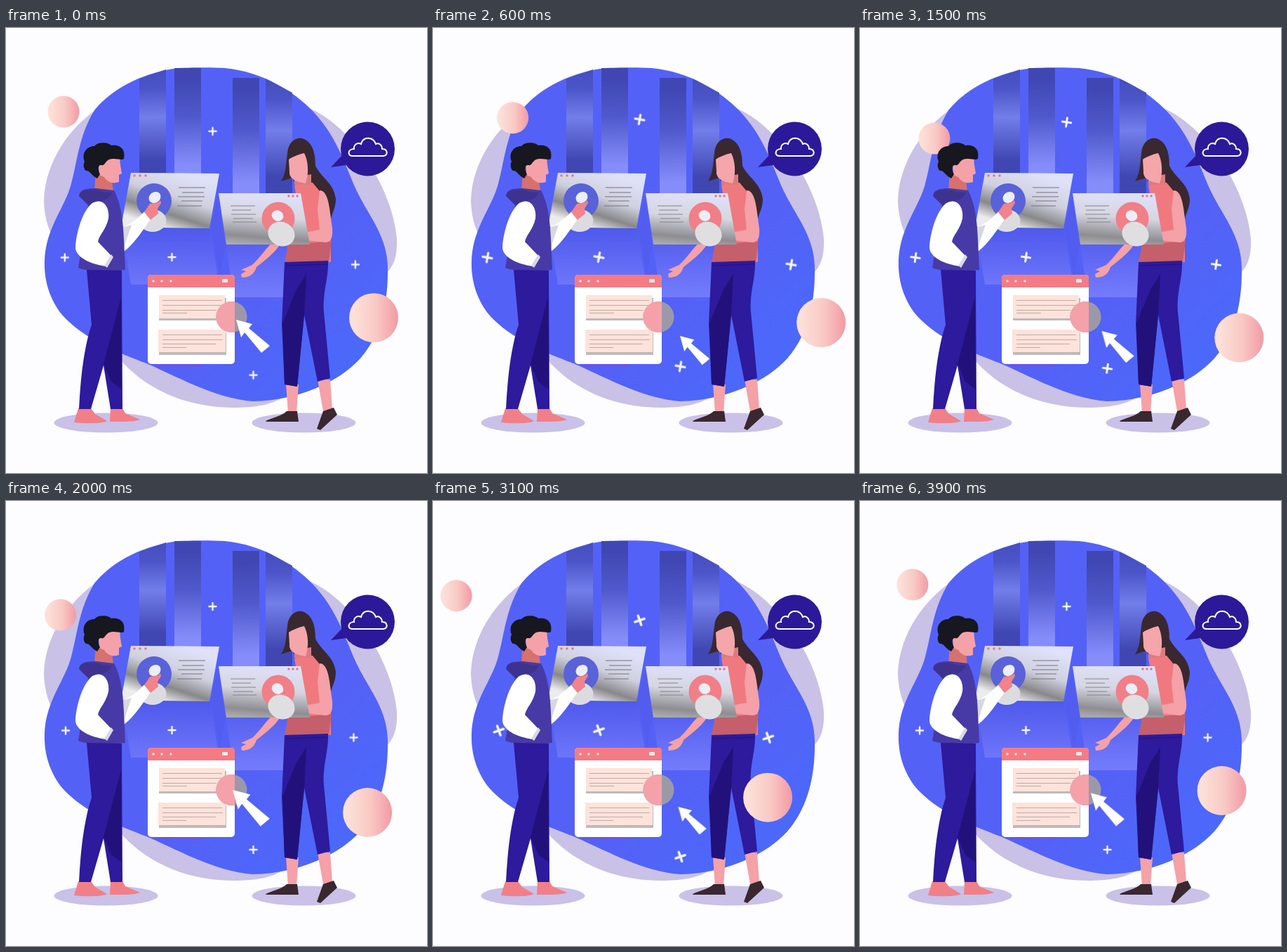
Recreate the animation shown at these times as an HTML page without scripts. Size 600 by 633 pixels, loop 4 s.

```html
<!DOCTYPE html>
<html lang="en">
<head>
<meta charset="utf-8">
<title>Shared screens</title>
<style>
  html, body { margin: 0; width: 100%; height: 100%; overflow: hidden; background: #fdfcfe; }
  svg { display: block; width: 600px; height: 633px; }

  .drift { --x: 0px; --y: 0px; --k: 1; animation: drift 4s linear infinite; }
  .twinkle { fill: none; stroke: #f4f5ff; stroke-width: 2.4; stroke-linecap: round; animation: twinkle 4s linear infinite; }
  .cursor { fill: #fff; animation: point 4s linear infinite; }

  @keyframes drift {
    0%, 100% { transform: translate(calc(var(--x) * .13), calc(var(--y) * .13)); }
    7.5% { transform: translate(calc(var(--x) * .52), calc(var(--y) * .52)); }
    15% { transform: translate(calc(var(--x) * .83), calc(var(--y) * .83)); }
    20% { transform: translate(calc(var(--x) * .96), calc(var(--y) * .96)); }
    25% { transform: translate(var(--x), var(--y)); }
    30% { transform: translate(calc(var(--x) * .92), calc(var(--y) * .92)); }
    37.5% { transform: translate(calc(var(--x) * .67), calc(var(--y) * .67)); }
    50% { transform: none; }
    62.5% { transform: translate(calc(var(--x) * var(--k) * -.56), calc(var(--y) * var(--k) * -.56)); }
    70% { transform: translate(calc(var(--x) * var(--k) * -.86), calc(var(--y) * var(--k) * -.86)); }
    77.5% { transform: translate(calc(var(--x) * var(--k) * -.98), calc(var(--y) * var(--k) * -.98)); }
    87.5% { transform: translate(calc(var(--x) * var(--k) * -.6), calc(var(--y) * var(--k) * -.6)); }
    97.5% { transform: none; }
  }
  @keyframes twinkle {
    0%, 50%, 97.5%, 100% { transform: none; }
    15% { transform: rotate(10deg) scale(1.32); }
    25% { transform: rotate(14deg) scale(1.42); }
    37.5% { transform: rotate(8deg) scale(1.25); }
    62.5% { transform: rotate(-9deg) scale(1.27); }
    77.5% { transform: rotate(-19deg) scale(1.42); }
  }
  @keyframes point {
    0%, 100% { transform: translate(328px, 415px); }
    15% { transform: translate(352px, 438px) scale(.88); }
    25% { transform: translate(356px, 442px) scale(.85); }
    37.5% { transform: translate(344.5px, 431px) scale(.96); }
    50% { transform: translate(323px, 411px) scale(1.1); }
    62.5% { transform: translate(337.5px, 423.5px) scale(.97); }
    75% { transform: translate(350px, 435.5px) scale(.84); }
    77.5% { transform: translate(349.5px, 435px) scale(.84); }
    97.5% { transform: translate(329px, 415.5px); }
  }
</style>
</head>
<body>
<svg viewBox="0 0 600 633">
  <defs>
    <linearGradient id="blob" x1="0" y1="0" x2="1" y2="1">
      <stop offset=".66" stop-color="#5461f7"/><stop offset=".9" stop-color="#4a69fa"/>
    </linearGradient>
    <linearGradient id="ball">
      <stop offset=".1" stop-color="#fce0d8"/><stop offset=".55" stop-color="#f9c9c4"/><stop offset="1" stop-color="#f29aa4"/>
    </linearGradient>
    <linearGradient id="beamA" x2="0" y2="1">
      <stop stop-color="#464ebf"/><stop offset=".18" stop-color="#4c55c8"/><stop offset=".45" stop-color="#727eea"/><stop offset=".85" stop-color="#4047b2"/>
    </linearGradient>
    <linearGradient id="beamB" x2="0" y2="1">
      <stop offset=".1" stop-color="#4047b3"/><stop offset=".45" stop-color="#5059cb"/><stop offset=".9" stop-color="#858dfb"/>
    </linearGradient>
    <linearGradient id="glow" x2="0" y2="1">
      <stop stop-color="#4f59ec"/><stop offset="1" stop-color="#747cfc"/>
    </linearGradient>
    <linearGradient id="glass" gradientUnits="userSpaceOnUse" x1="245" y1="206" x2="220" y2="283">
      <stop stop-color="#dfe1f9"/><stop offset=".42" stop-color="#cfd0de"/><stop offset=".74" stop-color="#88888b"/><stop offset="1" stop-color="#ececec"/>
    </linearGradient>
    <linearGradient id="glass2" x1=".55" y1="0" x2=".4" y2="1">
      <stop stop-color="#dfe1f9"/><stop offset=".45" stop-color="#d5d6e1"/><stop offset=".85" stop-color="#8e8e92"/><stop offset="1" stop-color="#a9a9ac"/>
    </linearGradient>
    <path id="plus" d="M-5 0H5M0-5V5"/>
  </defs>

  <rect width="600" height="633" fill="#fdfcfe"/>

  <!-- backdrop -->
  <path fill="#c9c1e6" d="M130 115C93 140 56 188 54 245C55 290 75 310 90 340L150 455C180 500 240 540 325 540C350 540 385 537 400 520L535 352C552 345 558 325 557 300C550 222 488 137 432 114Z"/>
  <path fill="url(#blob)" d="M245 57C270 56 295 56 312 57C365 62 410 90 437 118C472 155 482 192 499 230C517 268 543 295 544 340C545 390 535 435 505 470C470 508 410 530 352 531C300 528 240 494 200 477C160 462 110 442 80 408C60 383 54 355 55 330C57 285 82 258 92 225C102 190 103 155 126 117C155 82 200 63 245 57Z"/>
  <path fill="url(#beamA)" d="M190 72L228 59V210H190Z"/>
  <path fill="url(#beamB)" d="M240 57H278V210H240Z"/>
  <path fill="url(#beamB)" d="M323 71H361V236H323Z"/>
  <path fill="url(#beamA)" d="M370 72L408 92V236H370Z"/>
  <path fill="url(#glow)" d="M165 285H290L304 365H178ZM314 308H430L412 383H324Z"/>
  <path fill="#525df0" d="M302 240L313 308L305 350L291 285Z"/>

  <ellipse cx="142.5" cy="561.5" rx="74" ry="14" fill="#c9c1e8"/>
  <ellipse cx="424.5" cy="561.5" rx="74" ry="14" fill="#c9c1e8"/>

  <circle r="22.5" fill="url(#ball)">
    <animateMotion dur="4s" repeatCount="indefinite" calcMode="linear"
      path="M82 119.1a45.5 21.5 0 0 1-10 42.8a45.5 21.5 0 0 1 10-42.8"
      keyTimes="0;.15;.375;.5;.625;.775;.975;1" keyPoints="0;.152;.341;.473;.596;.755;.966;1"/>
  </circle>

  <!-- speech bubble -->
  <g fill="#2c1999">
    <circle cx="515.5" cy="172" r="38.5"/>
    <path d="M463 198L482 178L500 193Z"/>
    <path fill="none" stroke="#fff" stroke-width="2" d="M494 182H538C545 181 544 172 536 172C536 166 531 163 527 165C523 154 509 154 506 165C500 162 495 167 496 172C487 172 486 182 494 182Z"/>
  </g>

  <!-- left screen -->
  <path fill="url(#glass)" d="M178 206L304 207L290 285L164 283Z"/>
  <g fill="#e9747f"><circle cx="183" cy="210" r="1.7"/><circle cx="191" cy="210" r="1.7"/><circle cx="199" cy="210" r="1.7"/></g>
  <path stroke="#77777e" stroke-width="1.1" d="M246 227H284M251 234H282M245 240H283M250 246H280M244 253H279"/>
  <circle cx="211" cy="246" r="25" fill="#5962d8"/>
  <ellipse cx="209" cy="274" rx="19.5" ry="16" fill="#dcdce0"/>
  <ellipse cx="212" cy="241" rx="9" ry="7.5" transform="rotate(-35 212 241)" fill="#eceef8"/>

  <!-- woman -->
  <g>
    <path fill="#f4a1a7" d="M382 303L390 309C380 323 367 332 357 340C354 350 347 355 336 355L335 350L342 346L335 344L351 337C362 327 371 312 382 303Z"/>
    <path fill="#392830" d="M401 178C402 163 412 155 422 157C438 162 441 180 441 196C450 214 467 220 470 243C470 259 462 266 463 276L438 262L414 224L408 213L392 218C399 208 399 194 401 178Z"/>
    <path fill="#f0797f" d="M411 224L424 219L437 220L447 232L463 282V333H398L403 303H425Z"/>
    <path fill="#c55f6b" d="M403 306H430L464 303L460 333H397Z"/>
    <path fill="#f4a1a7" d="M447 231C455 231 459 242 461 256L465 285C466 299 463 305 455 305L429 302L425 291L447 287L444 258Z"/>
    <path fill="#dc7c80" d="M411 213L435 208V223H411Z"/>
    <path fill="#f4a6aa" d="M403 187L412 180L425 178C431 189 432 208 427 221C413 219 403 214 404 204Z"/>
    <path fill="#392830" d="M401 187C404 168 419 160 427 177C415 180 409 184 401 187Z"/>
    <path fill="#f4a1a7" d="M399 507H417L414 547H402ZM444 500H462L465 542L452 545Z"/>
    <path fill="#392830" d="M370 559C380 554 393 552 400 545H415L417 560H371ZM452 545L467 540L472 550L448 572L443 570Z"/>
    <path fill="#2d1a9c" d="M397 333L459 331C460 356 451 375 453 404L462 498L444 503L425 408L415 510L397 507L393 421Z"/>
    <path fill="#22117a" d="M428 350L414 372L394 420L397 507L415 510L425 408Z"/>
    <path stroke="#22117a" fill="none" d="M399 338L458 336"/>
  </g>

  <!-- right screen -->
  <path fill="url(#glass2)" d="M303 235L420 235L433 308L314 308Z"/>
  <g fill="#e9747f"><circle cx="403" cy="239" r="1.7"/><circle cx="409" cy="239" r="1.7"/><circle cx="415" cy="239" r="1.7"/></g>
  <path stroke="#85858c" stroke-width="1.1" d="M320 253H355M322 259H349M321 265H356M324 271H352M323 276H357"/>
  <circle cx="388" cy="271" r="23.5" fill="#f17f87"/>
  <ellipse cx="392.5" cy="293" rx="19.5" ry="17" transform="rotate(25 392.5 293)" fill="#dfdfe2"/>
  <ellipse cx="387" cy="267" rx="8.5" ry="7.5" transform="rotate(30 387 267)" fill="#eceef6"/>

  <!-- man -->
  <g>
    <path fill="#d6716f" d="M128 205L151 216L153 232L126 231Z"/>
    <path fill="#f4a1a9" d="M132 193L146 181L162 184L163 195L165 207L161 209V219C153 222 145 220 140 212L133 209Z"/>
    <path fill="#17171f" d="M112 190C107 177 116 168 126 168C132 161 146 163 150 167C161 165 171 171 168 186C164 189 155 184 147 187C141 190 140 197 136 195C130 194 131 203 134 208L130 214C121 209 119 202 114 203C110 200 110 194 112 190Z"/>
    <path fill="#fff" d="M163 286C177 280 188 270 199 261L206 272C196 286 184 306 168 318Z"/>
    <path fill="#d7d7e0" d="M166 284L179 280L168 312Z"/>
    <path fill="#f0838c" d="M197 262L205 250L217 248L220 245L221 249L216 257L217 264L206 273Z"/>
    <path fill="#473aa6" d="M105 240C103 230 114 228 128 228L154 231C165 251 167 280 168 300L170 344C150 347 115 347 103 341C107 317 113 287 117 252Z"/>
    <path fill="#3d338f" d="M104 239C105 228 124 228 138 233L151 234C146 248 129 246 118 252Z"/>
    <path fill="#fff" d="M123 249C139 240 148 256 146 271C143 286 133 294 131 304L151 325L145 339C127 338 99 328 99 312C100 291 109 260 123 249Z"/>
    <path fill="#d9d8e7" d="M150 322L153 326L144 341L140 338Z"/>
    <path fill="#f17f88" d="M103 541H121L127 549L144 559C138 563 111 563 97 561ZM149 541H166L170 548L191 557C181 561 161 560 148 560Z"/>
    <path fill="#2d1a9c" d="M115 344L165 345L166 542H149L139 480L121 542H104C106 500 111 454 122 422Z"/>
    <path fill="#22117a" d="M164 383L139 478L150 503L165 514Z"/>
  </g>

  <!-- window -->
  <path fill="#6757e8" d="M214 478H280V482H214Z"/>
  <rect x="202" y="351" width="124" height="127" rx="5" fill="#fff"/>
  <path fill="#f47b84" d="M202 369V356Q202 351 207 351H321Q326 351 326 356V369Z"/>
  <g fill="#fde9e6"><circle cx="210" cy="360" r="1.7"/><circle cx="222" cy="360" r="1.7"/><circle cx="235" cy="360" r="1.7"/><rect x="308" y="357" width="8" height="5" rx="1"/></g>
  <path fill="#c0b9bb" d="M218 384H314V416H218ZM218 433H314V465H218Z"/>
  <path fill="#fde3da" d="M218 380H312V413H218ZM217 429H313V461H217Z"/>
  <path stroke="#c0a9a7" d="M223 387.5H308M223 394.5H310M223 401.5H300M223 405.5H258M223 436.5H308M223 443.5H309M223 449.5H299M223 454.5H257"/>
  <circle cx="321.5" cy="411" r="22" fill="#9b99a9"/>
  <path fill="#f4a1aa" d="M326 389.5A22 22 0 1 0 326 432.5Z"/>
  <path class="cursor" d="M0 0L23 6L18 12L48 37L36 47L12 18L7 25Z"/>

  <!-- sparkles -->
  <g transform="translate(294.5 150)"><g class="drift" style="--y:-24px;--k:.84"><use href="#plus" class="twinkle"/></g></g>
  <g transform="translate(85 326.5)"><g class="drift" style="--x:-9px"><use href="#plus" class="twinkle"/></g></g>
  <g transform="translate(236.5 326)"><use href="#plus" class="twinkle"/></g>
  <g transform="translate(495.5 336.5)"><g class="drift" style="--x:18px"><use href="#plus" class="twinkle"/></g></g>
  <g transform="translate(352.5 496)"><g class="drift" style="--y:-17.5px;--k:.58"><use href="#plus" class="twinkle"/></g></g>

  <circle r="35" fill="url(#ball)">
    <animateMotion dur="4s" repeatCount="indefinite" calcMode="linear"
      path="M524 412.2a43 15.5 0 0 1-14 30.6a43 15.5 0 0 1 14-30.6"
      keyTimes="0;.15;.375;.5;.625;.775;.975;1" keyPoints="0;.155;.343;.472;.597;.749;.955;1"/>
  </circle>
</svg>
</body>
</html>
```
